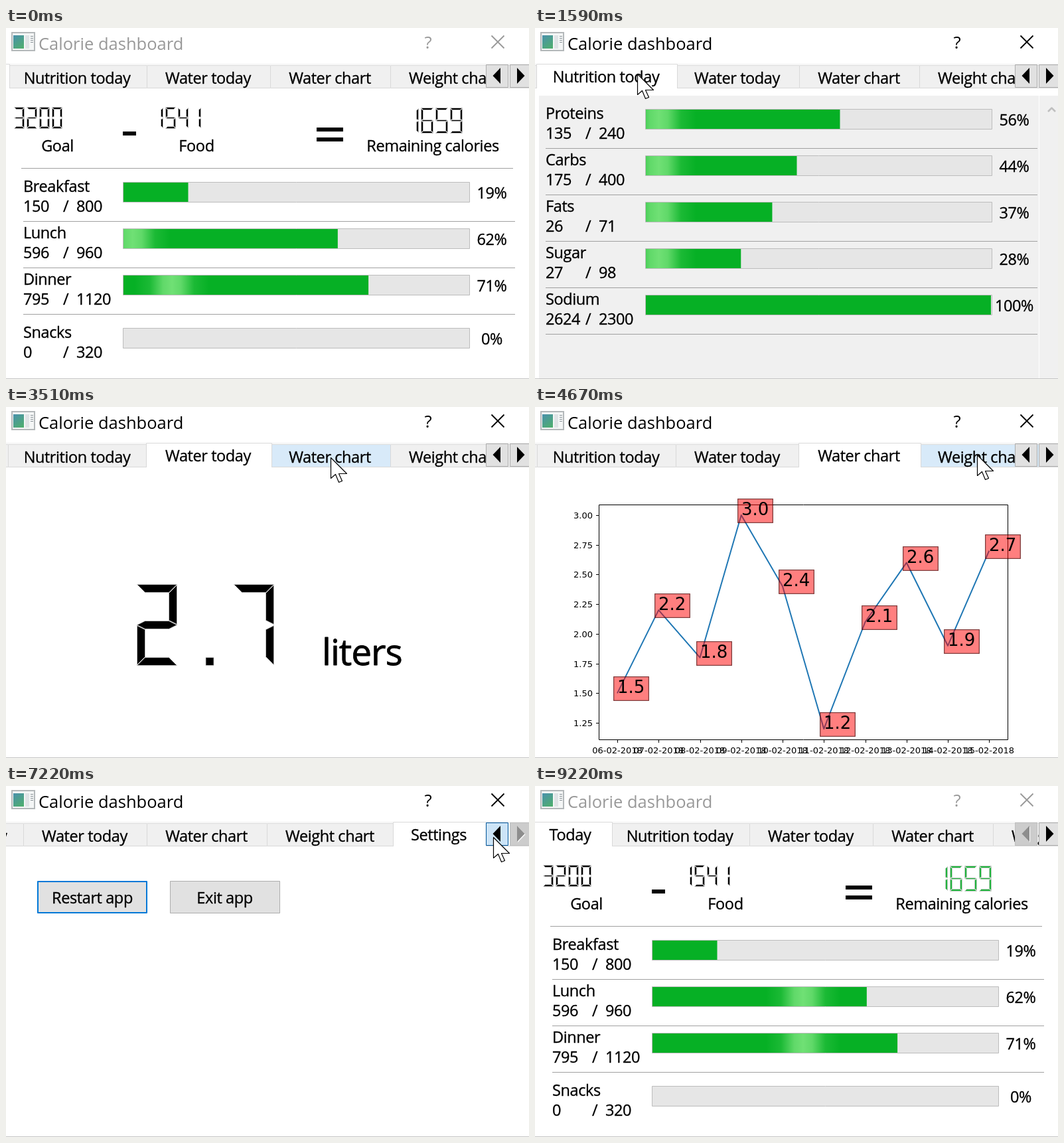
Write an HTML page with a canvas that moves like this. It is 788 by 529 pixels and loops after 9.32 s.

```html
<!DOCTYPE html>
<html lang="en">
<head>
<meta charset="utf-8">
<title>Calorie dashboard</title>
<style>
html, body { margin: 0; width: 100%; height: 100%; overflow: hidden; background: #fff; }
canvas { position: fixed; left: 0; top: 0; display: block; }
</style>
</head>
<body>
<canvas id="stage" width="788" height="529"></canvas>
<script>
const ctx = document.getElementById('stage').getContext('2d');
const LOOP = 9320, STEP = 76.2;
const UI = '"Open Sans", "Noto Sans", sans-serif';
const PLOT = '"DejaVu Sans", sans-serif';

// Tab label, left and right edge in unscrolled bar coordinates
const TABS = [
  ['Today', -7, 114], ['Nutrition today', 114, 323], ['Water today', 323, 509],
  ['Water chart', 509, 690], ['Weight chart', 690, 881], ['Settings', 881, 1018]
];

// [start time, value]
const PAGES = [[0, 0], [1300, 1], [2670, 2], [4140, 3], [5370, 4], [6980, 5], [8070, 0]];
const SCROLL = [[0, 111], [5370, 159], [6210, 297], [7290, 111], [7450, 0]];
const PRESS = [[0, ''], [6140, 'right'], [6210, ''], [7140, 'left'], [7290, ''], [7370, 'left'], [7450, '']];

// [time, x, y]
const POINTER = [
  [70, 240, 442], [910, 154, 69], [2040, 154, 69], [2440, 279, 79], [2780, 279, 79],
  [3500, 489, 76], [4240, 489, 76], [4650, 666, 72], [5540, 666, 72], [5890, 772, 71],
  [6380, 772, 71], [6880, 690, 75], [7080, 690, 75], [7160, 734, 77], [7640, 734, 77],
  [7910, 57, 74], [8060, 57, 74], [8300, -30, 76]
];

// Label, amount, goal, row top, shine offset at time 0
const MEALS = [
  ['Breakfast', 150, 800, 232, 220], ['Lunch', 596, 960, 302, 14],
  ['Dinner', 795, 1120, 372, 73], ['Snacks', 0, 320, 452, 0]
];
const NUTRIENTS = [
  ['Proteins', 135, 240, 122], ['Carbs', 175, 400, 192], ['Fats', 26, 71, 262],
  ['Sugar', 27, 98, 332], ['Sodium', 2624, 2300, 402]
];
const WEIGHTS = [82.2, 82.3, 83, 84, 83.2, 82.5, 83.7, 82.6, 82.8, 82.4];
const LITERS = [1.5, 2.2, 1.8, 3, 2.4, 1.2, 2.1, 2.6, 1.9, 2.7];

// Lit segments: top, upper left, upper right, middle, lower left, lower right, bottom
const DIGITS = {
  0: [0, 1, 2, 4, 5, 6], 1: [2, 5], 2: [0, 2, 3, 4, 6], 3: [0, 2, 3, 5, 6],
  4: [1, 2, 3, 5], 5: [0, 1, 3, 5, 6], 6: [0, 1, 3, 4, 5, 6], 7: [0, 2, 5], 9: [0, 1, 2, 3, 5, 6], '.': [7]
};

const at = (list, t) => list.reduce((value, [start, next]) => t >= start ? next : value, list[0][1]);

function rect(x, y, w, h, color) {
  ctx.fillStyle = color;
  ctx.fillRect(x, y, w, h);
}

function frame(x, y, w, h, color, line = 1) {
  ctx.strokeStyle = color;
  ctx.lineWidth = line;
  ctx.strokeRect(x + line / 2, y + line / 2, w - line, h - line);
}

function path(points) {
  ctx.beginPath();
  points.forEach(([x, y]) => ctx.lineTo(x, y));
}

function poly(points, color) {
  path(points);
  ctx.fillStyle = color;
  ctx.fill();
}

// Outline thickens the strokes, in em
function text(str, x, y, { size = 23.5, align = 'left', color = '#000', family = UI, gap = -0.4, outline = 0.014 } = {}) {
  ctx.font = `${size}px ${family}`;
  ctx.letterSpacing = gap + 'px';
  ctx.textAlign = align;
  ctx.fillStyle = color;
  ctx.fillText(str, x, y);
  if (!outline) return;
  ctx.strokeStyle = color;
  ctx.lineWidth = size * outline;
  ctx.strokeText(str, x, y);
}

function pointerAt(t) {
  if (t < POINTER[0][0]) return null;
  const i = POINTER.findIndex(key => key[0] > t);
  if (i < 0) return null;
  const [t0, x0, y0] = POINTER[i - 1], [t1, x1, y1] = POINTER[i];
  const p = (t - t0) / (t1 - t0), e = p * p * (3 - 2 * p);
  return { x: x0 + (x1 - x0) * e, y: y0 + (y1 - y0) * e };
}

function drawPointer({ x, y }) {
  ctx.save();
  ctx.translate(Math.round(x) + 0.5, Math.round(y) + 0.5);
  path([[0, 0], [0, 31], [7, 25], [12, 37], [17, 35], [12, 24], [24, 24]]);
  ctx.closePath();
  ctx.fillStyle = '#fff';
  ctx.fill();
  ctx.strokeStyle = '#000';
  ctx.lineWidth = 1.2;
  ctx.stroke();
  ctx.restore();
}

function drawTitle(active) {
  const color = active ? '#000' : '#999';
  const style = { color, gap: 0, outline: 0 };
  rect(8, 6, 36, 29, '#b4b8ba');
  rect(10, 8, 32, 25, '#f4f6f6');
  const g = ctx.createLinearGradient(10, 10, 26, 32);
  g.addColorStop(0, '#4a8fb0');
  g.addColorStop(1, '#4fb06a');
  rect(11, 11, 16, 20, g);
  rect(29, 11, 6, 20, '#dfe3e6');
  for (let y = 12; y < 24; y += 3) rect(37, y, 4, 1, '#8a9298');
  text('Calorie dashboard', 49, 33, { ...style, size: 25.5 });
  text('?', 636, 31, { ...style, size: 26, align: 'center' });
  ctx.strokeStyle = color;
  ctx.lineWidth = 1.8;
  ctx.beginPath();
  ctx.moveTo(731.5, 11.5); ctx.lineTo(750.5, 30.5);
  ctx.moveTo(750.5, 11.5); ctx.lineTo(731.5, 30.5);
  ctx.stroke();
}

function drawTab(i, scroll, selected, pointer) {
  const [label, from, to] = TABS[i];
  const x = from - scroll, w = to - from;
  const hover = pointer && pointer.y > 55 && pointer.y < 91 && pointer.x < 723 &&
    pointer.x >= x && pointer.x < x + w;
  if (selected) {
    rect(x - 1, 54, w + 4, 38, '#fff');
    path([[x - 0.5, 91], [x - 0.5, 54.5], [x + w + 2.5, 54.5], [x + w + 2.5, 91]]);
    ctx.strokeStyle = '#d9d9d9';
    ctx.lineWidth = 1;
    ctx.stroke();
  } else {
    rect(x, 56, w + 1, 35, hover ? '#d8eaf9' : '#f0f0f0');
    frame(x, 56, w + 1, 35, '#d9d9d9');
  }
  text(label, x + w / 2 - 0.5, selected ? 82 : 84, { align: 'center' });
}

function drawArrow(side, enabled, pressed, pointer) {
  const left = side === 'left', x = left ? 723 : 759, w = left ? 34 : 31;
  const hover = pointer && pointer.y > 55 && pointer.y < 90 && pointer.x >= x && pointer.x < x + w;
  const [fill, edge] = !enabled ? ['#cccccc', '#bfbfbf'] : pressed ? ['#cce4f7', '#005499'] :
    hover ? ['#e5f1fb', '#0078d7'] : ['#e1e1e1', '#adadad'];
  rect(x, 55, w, 35, fill);
  frame(x, 55, w, 35, edge);
  const tip = left ? 733.5 : 781.5, base = left ? 745 : 770;
  const shape = d => [[tip + d, 72 + d], [base + d, 60 + d], [base + d, 84 + d]];
  if (!enabled) poly(shape(1), '#fff');
  poly(shape(0), enabled ? '#000' : '#8d8d8d');
}

function drawTabs(t, page, pointer) {
  const scroll = at(SCROLL, t), press = at(PRESS, t);
  rect(0, 54, 788, 1, '#eeeeee');
  rect(0, 90, 788, 1, '#d9d9d9');
  ctx.save();
  ctx.beginPath();
  ctx.rect(0, 54, 759, 38);
  ctx.clip();
  TABS.forEach((_, i) => i !== page && drawTab(i, scroll, false, pointer));
  drawTab(page, scroll, true, pointer);
  ctx.restore();
  drawArrow('left', scroll > 0, press === 'left', pointer);
  drawArrow('right', scroll < 297, press === 'right', pointer);
}

function segment(k, n) {
  const w = Math.floor(n / 5), h = Math.floor(w / 2), e = n - 1;
  return [
    [[0, 0], [e, 0], [e - w, w], [w, w]],
    [[0, 1], [w, w + 1], [w, n - h - 1], [0, n - 1]],
    [[e, 1], [e, n - 1], [e - w, n - h - 1], [e - w, w + 1]],
    [[0, n], [w, n - h], [e - w, n - h], [e, n], [e - w, n + h], [w, n + h]],
    [[0, n + 1], [w, n + h + 1], [w, 2 * n - w - 1], [0, 2 * n - 1]],
    [[e, n + 1], [e, 2 * n - 1], [e - w, 2 * n - w - 1], [e - w, n + h + 1]],
    [[0, 2 * n], [e, 2 * n], [e - w, 2 * n - w], [w, 2 * n - w]],
    [[n / 2, 2 * n], [n / 2 + w, 2 * n], [n / 2 + w, 2 * n - w], [n / 2, 2 * n - w]]
  ][k];
}

function drawLcd(str, x, y, n, color = '#000') {
  const pitch = Math.floor(n * 6 / 5);
  ctx.strokeStyle = '#c8c8c8';
  ctx.lineWidth = 0.8;
  [...str].forEach((ch, i) => {
    ctx.save();
    ctx.translate(x + i * pitch + 0.5, y + 0.5);
    for (const k of DIGITS[ch]) {
      poly(segment(k, n), color);
      ctx.closePath();
      ctx.stroke();
    }
    ctx.restore();
  });
}

function drawBar(x, y, ratio, offset) {
  const w = 520 * Math.min(ratio, 1);
  rect(x, y, 523, 31, '#e6e6e6');
  frame(x, y, 523, 31, '#bcbcbc');
  rect(x + 1, y + 1, w, 29, '#06b025');
  if (ratio <= 0 || ratio >= 1) return;
  const span = w + 240;
  const c = x + 1 - 60 + ((offset + 60) % span + span) % span;
  const g = ctx.createLinearGradient(c - 56, 0, c + 56, 0);
  [[0, 0], [0.2, 0.2], [0.38, 0.85], [0.5, 1], [0.62, 0.85], [0.8, 0.2], [1, 0]]
    .forEach(([p, a]) => g.addColorStop(p, `rgba(112,224,117,${a})`));
  ctx.save();
  ctx.beginPath();
  ctx.rect(x + 1, y + 1, w, 29);
  ctx.clip();
  rect(c - 56, y + 1, 112, 29, g);
  ctx.restore();
}

function drawRow([label, amount, goal, y], x, offset) {
  text(label, x, y + 15);
  text(amount, x, y + 45);
  text('/', x + 60, y + 45);
  text(goal, x + 80, y + 45);
  drawBar(x + 150, y, amount / goal, offset);
  text(Math.min(100, Math.round(amount / goal * 100)) + '%', x + 706, y + 25, { align: 'center' });
}

function drawToday(t, now) {
  const first = t < 1300;
  drawLcd('3200', 12, 119, 16);
  drawLcd('1541', 221, 119, 16);
  drawLcd('1659', 603, 120, 19, first ? '#000' : '#1fb43c');
  text('Goal', 77.5, 186, { align: 'center' });
  text('Food', 287, 186, { align: 'center' });
  text('Remaining calories', 643, 186, { align: 'center' });
  rect(176, 156, 20, 6, '#000');
  rect(468, 150, 40, 6, '#000');
  rect(468, 165, 40, 6, '#000');
  rect(23, 211, 741, 1, '#a0a0a0');
  for (let y = 291; y < 440; y += 70) rect(26, y, 741, 1, '#a0a0a0');
  for (const meal of MEALS) drawRow(meal, 26, first ? meal[4] + now / 4 : 17 + (now - 8380) / 4);
}

function drawNutrition(t, now) {
  rect(6, 102, 753, 426, '#f0f0f0');
  rect(760, 102, 28, 426, '#f0f0f0');
  path([[773, 126], [778.5, 120.5], [784, 126]]);
  ctx.strokeStyle = '#bfbfbf';
  ctx.lineWidth = 2.5;
  ctx.stroke();
  for (const item of NUTRIENTS) {
    drawRow(item, 16, 17 + (now - 1590) / 4);
    rect(16, item[3] + 59, 741, 1, '#a0a0a0');
  }
}

function drawWater() {
  drawLcd('2.7', 197, 267, 61);
  text('liters', 476, 389, { size: 55, gap: -1 });
}

function drawChart(values, top) {
  const px = i => 124 + i * 62.25, py = v => 163 + (top - v) * 178.9;
  const plain = { family: PLOT, gap: 0, outline: 0 }, small = { ...plain, size: 13 };
  for (let i = 0; i < 8; i++) {
    const v = top - i / 4, y = Math.round(py(v));
    rect(92, y, 4, 1, '#000');
    text(v.toFixed(2), 87, y + 5, { ...small, align: 'right' });
  }
  values.forEach((_, i) => {
    rect(Math.round(px(i)), 501, 1, 5, '#000');
    text(String(i + 6).padStart(2, '0') + '-02-2018', px(i), 522, { ...small, align: 'center' });
  });
  path(values.map((v, i) => [px(i), py(v)]));
  ctx.strokeStyle = '#1f77b4';
  ctx.lineWidth = 2;
  ctx.stroke();
  frame(96, 147, 617, 355, '#000');
  values.forEach((v, i) => {
    const label = v.toFixed(1), x = Math.round(px(i)), y = Math.round(py(v));
    const w = label.length > 3 ? 70 : 54;
    rect(x - 6, y - 25, w, 37, 'rgba(255,0,0,0.5)');
    frame(x - 6, y - 25, w, 37, 'rgba(0,0,0,0.5)', 1.3);
    text(label, x, y, { ...plain, size: 26 });
  });
}

function drawSettings() {
  rect(47, 143, 166, 49, '#e1e1e1');
  frame(47, 143, 166, 49, '#0078d7', 2);
  text('Restart app', 130, 177, { align: 'center' });
  rect(247, 143, 166, 49, '#e1e1e1');
  frame(247, 143, 166, 49, '#adadad');
  text('Exit app', 329.5, 177, { align: 'center' });
}

const VIEWS = [drawToday, drawNutrition, drawWater,
  () => drawChart(LITERS, 3), () => drawChart(WEIGHTS, 84), drawSettings];

function draw(t) {
  const now = Math.floor((t + 20) / STEP) * STEP;
  const page = at(PAGES, t), pointer = pointerAt(now);
  ctx.lineJoin = 'round';
  rect(0, 0, 788, 529, '#fff');
  drawTitle(t >= 1300 && t < 9070);
  VIEWS[page](t, now);
  drawTabs(t, page, pointer);
  rect(0, 528, 788, 1, '#c6c6c6');
  if (pointer) drawPointer(pointer);
}

const start = performance.now();
function tick() {
  draw((performance.now() - start) % LOOP);
  requestAnimationFrame(tick);
}
tick();
</script>
</body>
</html>
```
